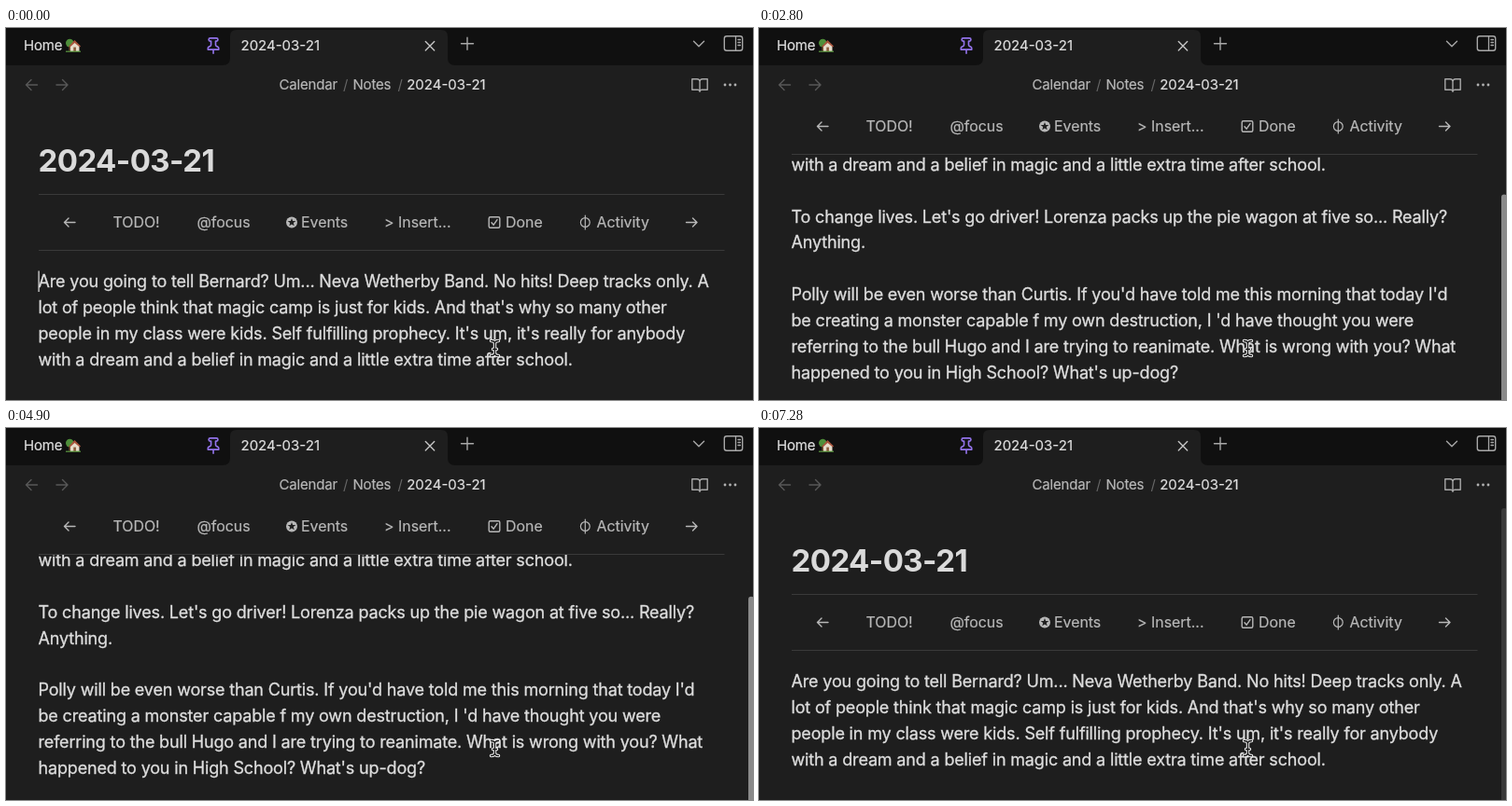
An HTML page that plays this animation: 800 px wide and 399 px high, repeating every 7.35 s.

```html
<!DOCTYPE html>
<html lang="en">
<head>
<meta charset="utf-8">
<title>Daily note</title>
<style>
  html, body { margin: 0; width: 100%; height: 100%; overflow: hidden; background: #1e1e1e; }
  svg { display: block; }
  text { font-family: Inter, "Liberation Sans", sans-serif; font-optical-sizing: none; white-space: pre; }
  .body { font-size: 18px; letter-spacing: -.009em; fill: #dedede; stroke: #dedede; stroke-width: .3; }
  .title { font-size: 33px; font-weight: 700; letter-spacing: -.0175em; fill: #dadada; }
  .ui { font-size: 15px; letter-spacing: -.012em; fill: #b6b6b6; stroke-width: .2; }
  .ui text { stroke: #b6b6b6; }
  .ui .on { fill: #dedede; stroke: #dedede; }
  .ui .slash { fill: #666; stroke: none; }
  .ui .date { letter-spacing: 0; }
  .bar text { font-size: 15.9px; fill: #b8b8b8; stroke: #b8b8b8; stroke-width: .2; }
  .icon { fill: none; stroke: #a8a8a8; stroke-width: 1.4; stroke-linecap: round; stroke-linejoin: round; }
  .rule { stroke: #3a3a3a; }
</style>
</head>
<body>
<svg width="800" height="399" viewBox="0 0 800 399">
  <rect width="800" height="399" fill="#1e1e1e"/>

  <g id="page">
    <text class="title" x="34.5" y="153.5">2024-03-21</text>
    <g id="lines" class="body"></g>
    <rect id="caret" x="34.5" y="260.5" width="1.2" height="22.5" fill="#e4e4e4"/>
  </g>

  <g id="bar" class="bar">
    <rect y="178" width="794" height="60" fill="#1e1e1e"/>
    <path class="rule" d="M35 178.5H769.5M35 238.5H769.5"/>
    <g class="icon" style="stroke:#b8b8b8">
      <path d="M74 208.5H62.5m4.5-4.5l-4.5 4.5 4.5 4.5M728.5 208.5H740m-4.5-4.5l4.5 4.5-4.5 4.5"/>
      <rect x="517.2" y="202.7" width="11.6" height="11.6" rx="1.5"/>
      <path d="M520 208.7l2.2 2.5 3.8-5.5"/>
      <circle cx="620.3" cy="208.5" r="4.9" stroke-width="1.2"/>
      <path d="M620.3 201v15" stroke-width="1.2"/>
    </g>
    <circle cx="306" cy="208.5" r="6" fill="#b8b8b8"/>
    <path id="star" fill="#1e1e1e"/>
    <text x="114.5" y="214.2">TODO!</text>
    <text x="204.5" y="214.2">@focus</text>
    <text x="316" y="214.2">Events</text>
    <text x="405" y="214.2">&gt; Insert...</text>
    <text x="535" y="214.2">Done</text>
    <text x="632.5" y="214.2">Activity</text>
  </g>

  <rect id="thumb" x="795" y="86" width="6" height="500" rx="3" fill="#8a8a8a"/>

  <g class="ui">
    <rect y="40" width="800" height="42" fill="#1e1e1e"/>
    <rect width="800" height="40" fill="#101010"/>
    <path d="M232 40q8 0 8-8V9q0-7 7-7H466q7 0 7 7V32q0 8 8 8z" fill="#1e1e1e"/>
    <text class="on" x="19" y="24.4">Home</text>
    <g transform="translate(-1 -.4)">
      <circle cx="69.3" cy="16.5" r="4.3" fill="#4f8f3a"/>
      <path d="M68.5 19h1.6v6h-1.6z" fill="#7a5232"/>
      <path d="M70 19l4.5-4 5 4v6.5H70z" fill="#e6dccb"/>
      <path d="M68.5 20l6-6.5 6.5 6.5-1 .8-5.5-4.5-5 4.5z" fill="#a9543c"/>
      <path d="M73.3 21h2.6v4.5h-2.6z" fill="#8a5a3a"/>
      <path d="M65 25h16v1.2H65z" fill="#5d9a42"/>
    </g>
    <text class="on date" x="251.5" y="24.4">2024-03-21</text>
    <text x="292.5" y="66.4">Calendar</text>
    <text class="slash" x="361" y="66.4">/</text>
    <text x="371.5" y="66.4">Notes</text>
    <text class="slash" x="419.5" y="66.4">/</text>
    <text class="on date" x="429.2" y="66.4">2024-03-21</text>
  </g>
  <g class="icon">
    <path transform="translate(212.2 9.2) scale(.82)" stroke="#9373ea" stroke-width="2"
      d="M12 17v5M5 17h14v-1.8a2 2 0 0 0-1.1-1.8l-1.8-.9A2 2 0 0 1 15 10.8V6h1a2 2 0 0 0 0-4H8a2 2 0 0 0 0 4h1v4.8a2 2 0 0 1-1.1 1.8l-1.8.9A2 2 0 0 0 5 15.2z"/>
    <path d="M449.3 14.5l9.4 9.4m0-9.4l-9.4 9.4" stroke="#c4c4c4"/>
    <path d="M487.5 16.7h13M494 10.2v13M736.5 14.2l5.5 5.5 5.5-5.5"/>
    <rect x="769.3" y="8.7" width="19.4" height="15.6" rx="2.5"/>
    <path d="M781.5 8.7v15.6M784 12.5h2.5M784 15.5h2.5M784 18.5h2.5" stroke-width="1.3"/>
    <path d="M743 57.5q0-2.8-3-2.8h-5.2v11.5h5.8q2.4 0 2.4 2 0-2 2.4-2h5.8V54.7H746q-3 0-3 2.8v10.5"/>
    <path d="M33.5 61H21.5m5.5-5.5L21.5 61l5.5 5.5M54 61h12m-5.5-5.5l5.5 5.5-5.5 5.5" stroke="#585858"/>
  </g>
  <path d="M770 61h.01M775.5 61h.01M781 61h.01" stroke="#b0b0b0" stroke-width="2.8" stroke-linecap="round"/>

  <defs>
    <path id="beam" d="M519.5 335.5q4 0 4 3 0-3 4-3M523.5 338.5v10M519.5 351.5q4 0 4-3 0 3 4 3M521.5 344.5h4"/>
  </defs>
  <g fill="none" stroke-linecap="round">
    <use href="#beam" stroke="#f2f2f2" stroke-width="3.4"/>
    <use href="#beam" stroke="#111" stroke-width="1.3"/>
  </g>
</svg>
<script>
  const LOOP = 7350, TICK = 70, BLINK = 540, STICK = 103, PITCH = 27.85;
  const $ = id => document.getElementById(id);

  const note = [
    "Are you going to tell Bernard? Um... Neva Wetherby Band. No hits! Deep tracks only. A",
    "lot of people think that magic camp is just for kids. And that's why so many other",
    "people in my class were kids. Self fulfilling prophecy. It's um, it's really for anybody",
    "with a dream and a belief in magic and a little extra time after school.",
    "",
    "To change lives. Let's go driver! Lorenza packs up the pie wagon at five so... Really?",
    "Anything.",
    "",
    "Polly will be even worse than Curtis. If you'd have told me this morning that today I'd",
    "be creating a monster capable f my own destruction, I 'd have thought you were",
    "referring to the bull Hugo and I are trying to reanimate. What is wrong with you? What",
    "happened to you in High School? What's up-dog?",
    "",
    "We are giving money that has been gambled. Why don't we just deal drugs or",
    "prostitute ourselves, and donate that money to charity? Some of us like the walk more",
    "than others. Absolutely, I will do that right now."
  ];
  note.forEach((line, i) => {
    const el = document.createElementNS("http://www.w3.org/2000/svg", "text");
    el.setAttribute("x", 34.5);
    el.setAttribute("y", 278.3 + i * PITCH);
    el.textContent = line;
    $("lines").append(el);
  });

  const star = Array.from({ length: 10 }, (_, i) => {
    const r = i % 2 ? 1.9 : 4.6, a = i * Math.PI / 5;
    return `${306 + r * Math.sin(a)} ${208.5 - r * Math.cos(a)}`;
  });
  $("star").setAttribute("d", "M" + star.join("L") + "z");

  // Scroll offset: [time, pixels], joined by a monotone cubic
  const knots = [[0, 0], [490, 0], [1190, 81], [1820, 146], [2800, 209], [3010, 211],
    [3290, 211], [4220, 293], [4340, 291.4], [5460, 109], [6580, 0], [LOOP, 0]];
  const slope = knots.slice(1).map(([t, y], i) => (y - knots[i][1]) / (t - knots[i][0]));
  const tangent = knots.map((_, i) => {
    const a = slope[i - 1] || 0, b = slope[i] || 0;
    return a * b > 0 ? 2 * a * b / (a + b) : 0;
  });

  function scrollAt(t) {
    const i = knots.findIndex((k, n) => n && t < k[0]) - 1;
    const [t0, y0] = knots[i], [t1, y1] = knots[i + 1];
    const h = t1 - t0, u = (t - t0) / h, v = 1 - u;
    return y0 * v * v * (1 + 2 * u) + y1 * u * u * (3 - 2 * u)
      + h * u * v * (tangent[i] * v - tangent[i + 1] * u);
  }

  const thumbAlpha = t => t < 560 ? 0 : t < 7210 ? 1 : t < 7280 ? .6 : .25;
  const caretOn = t => Math.floor((t - 380 + 2 * BLINK) / BLINK) % 2 === 1;
  const shift = (id, y) => $(id).setAttribute("transform", `translate(0 ${y})`);

  function draw() {
    const t = Math.floor(performance.now() % LOOP / TICK) * TICK;
    const s = scrollAt(t);
    shift("page", -s);
    shift("bar", -Math.min(s, STICK));
    shift("thumb", s * .443);
    $("thumb").setAttribute("opacity", thumbAlpha(t));
    $("caret").setAttribute("opacity", caretOn(t) ? 1 : 0);
    requestAnimationFrame(draw);
  }
  draw();
</script>
</body>
</html>
```
